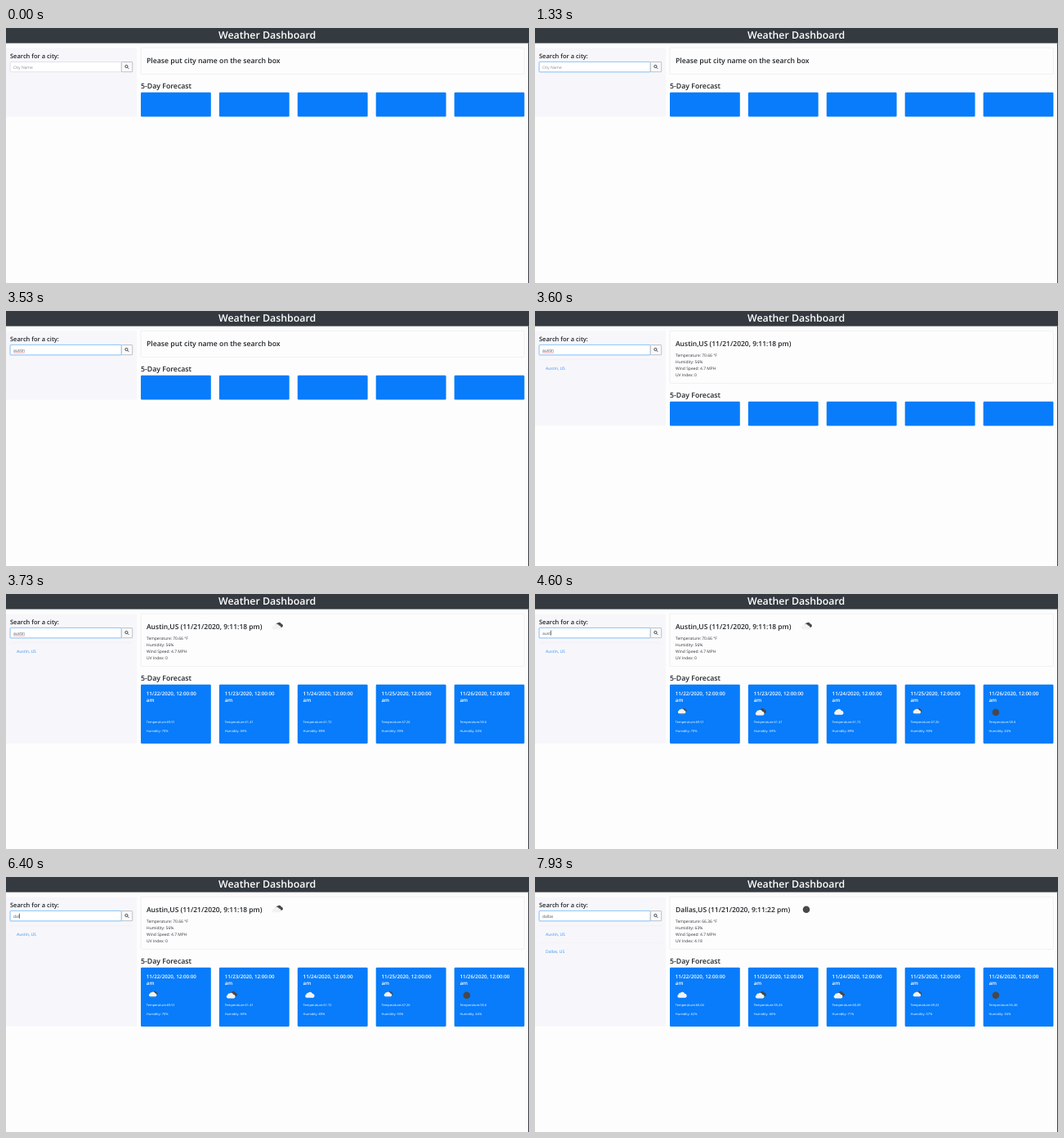
Write an HTML page that moves like this. It is 640 px wide and 312 px high and loops after 8 s.

```html
<!DOCTYPE html>
<html lang="en">
<head>
<meta charset="utf-8">
<title>Weather Dashboard</title>
<style>
  html, body { margin: 0; width: 100%; height: 100%; overflow: hidden; background: #fdfdfd; }
  svg { display: block; width: 100vw; height: 100vh; }
  text {
    font-family: "Open Sans", "Noto Sans", sans-serif;
    font-size: 4.95px; fill: #30353a; white-space: pre;
    text-rendering: geometricPrecision;
  }
  .head { font-weight: 600; fill: #212529; font-size: 8.7px; }
  .link { fill: #3a90f2; font-size: 5.05px; }
  .card-title { font-weight: 600; fill: #fff; font-size: 6.2px; }
  .card-text { fill: #fff; font-size: 3.97px; }
</style>
</head>
<body>
<svg id="stage" viewBox="0 0 640 312">
  <defs>
    <path id="puff" d="M-4 3.4a2.2 2.2 0 0 1-.5-4.2a2.1 2.1 0 0 1 2.3-1.9a3.2 3.2 0 0 1 5.3 1.1a2.6 2.6 0 0 1 .8 5z"/>
    <g id="clear"><circle r="4.3" cy=".4" fill="#48484a"/></g>
    <g id="cloud"><use href="#puff" fill="#f2f2f2"/></g>
    <g id="broken">
      <use href="#puff" transform="translate(2.2 -1.4) scale(.85)" fill="#48484a"/>
      <use href="#puff" transform="translate(-.8 .8) scale(.95)" fill="#f2f2f2"/>
    </g>
    <g id="rain">
      <use href="#puff" transform="translate(1.6 -2.2) scale(.68)" fill="#48484a"/>
      <use href="#puff" transform="translate(-.4 -.9) scale(.84)" fill="#f2f2f2"/>
      <path d="M-2 2.6l-.7 1.5M.4 2.6l-.7 1.5M2.8 2.6l-.7 1.5" stroke="#6b87a5" stroke-width=".6"/>
    </g>
  </defs>
  <rect width="640" height="312" fill="#fdfdfd"/>
  <rect id="side" y="24.5" width="160" fill="#f7f7fb"/>
  <rect width="640" height="18.6" fill="#343a40"/>
  <rect x="639" y="18.6" width="1" height="293.4" fill="#3c4045"/>
  <text class="head" x="319.6" y="13.4" text-anchor="middle" style="font-size:12.35px;fill:#fff">Weather Dashboard</text>

  <text class="head" x="5" y="37.2" style="font-size:7.5px">Search for a city:</text>
  <rect id="glow" x="4.5" y="40.8" width="137" height="13.7" rx="1.6" fill="#b8dafc"/>
  <rect id="input" x="5.2" y="41.5" width="136" height="12.2" rx=".8" fill="#fff" stroke-width=".6"/>
  <rect x="141.3" y="41.5" width="13.4" height="12.2" rx=".8" fill="#f8f9fa" stroke="#858c93" stroke-width=".5"/>
  <g fill="none" stroke="#343a40" stroke-width=".9">
    <circle cx="147.4" cy="47" r="1.6"/><path d="M148.6 48.2l1.7 1.7"/>
  </g>
  <text id="query" x="9" y="49.6"></text>
  <path id="squiggle" fill="none" stroke="#e5484d" stroke-width=".5"/>
  <rect id="caret" y="44.6" width=".6" height="6" fill="#111"/>
  <g id="history"></g>

  <rect id="panel" x="165" y="24.2" width="469.3" rx="1" fill="#fdfdfd" stroke="#e3e3e4" stroke-width=".5"/>
  <g id="now"></g>
  <text id="label" class="head" x="165" style="font-size:8.75px">5-Day Forecast</text>
  <g id="boxes" fill="#087cfa"></g>
  <g id="forecast"></g>
</svg>
<script>
const LOOP = 8000;
const $ = id => document.getElementById(id);
const set = (id, attrs) => { for (const k in attrs) $(id).setAttribute(k, attrs[k]); };
const text = (cls, x, y, str, more = '') => `<text class="${cls}" x="${x}" y="${y}" ${more}>${str}</text>`;
const icon = (name, x, y) => `<use href="#${name}" x="${x}" y="${y}"/>`;
const cardX = i => 165 + i * 95.9;

const cities = {
  Austin: {
    time: '9:11:18', temp: '70.66', humidity: 56, uv: '0', icon: 'broken',
    temps: ['69.51', '61.41', '61.72', '67.26', '58.6'],
    humidities: [70, 69, 89, 93, 46],
    icons: ['rain', 'broken', 'cloud', 'rain', 'clear']
  },
  Dallas: {
    time: '9:11:22', temp: '66.36', humidity: 63, uv: '4.18', icon: 'clear',
    temps: ['66.04', '55.45', '60.49', '69.22', '56.46'],
    humidities: [62, 66, 71, 57, 36],
    icons: ['cloud', 'broken', 'broken', 'rain', 'clear']
  }
};

// Input contents after each key press
const keys = [
  [1000, ''], [1660, 'a'], [1860, 'au'], [2000, 'aus'], [2200, 'aust'], [2330, 'austi'], [2530, 'austin'],
  [4400, 'austi'], [4600, 'aust'], [4800, 'aus'], [4930, 'au'], [5200, 'a'], [5530, ''],
  [5930, 'd'], [6130, 'da'], [6400, 'dal'], [6600, 'dall'], [6860, 'dalla'], [7330, 'dallas']
];

function nowView(name, withIcon) {
  if (!name) return text('head', 172, 43, 'Please put city name on the search box');
  const c = cities[name];
  const rows = [`Temperature: ${c.temp} °F`, `Humidity: ${c.humidity}%`, 'Wind Speed: 4.7 MPH', `UV Index: ${c.uv}`];
  return text('head', 172, 43, `${name},US (11/21/2020, ${c.time} pm)`, 'style="font-size:8.5px"') +
    rows.map((r, i) => text('', 172, 56 + i * 8, r)).join('') +
    (withIcon ? icon(c.icon, 332, 39.3) : '');
}

function forecastView(name, withIcons) {
  if (!name) return '';
  const c = cities[name];
  return c.temps.map((temp, i) => {
    const x = cardX(i) + 6.8;
    return text('card-title', x, 124, `11/${22 + i}/2020, 12:00:00`) +
      text('card-title', x, 132, 'am') +
      (withIcons ? icon(c.icons[i], x + 8.4, 144.4) : '') +
      text('card-text', x, 157.6, `Temperature:${temp}`) +
      text('card-text', x, 169.4, `Humidity: ${c.humidities[i]}%`);
  }).join('');
}

function historyView(names) {
  return names.map((n, i) =>
    `<path d="M5 ${59.5 + i * 21}H155" stroke="#ececf0" stroke-width=".5"/>` +
    text('link', 13, 72 + i * 21, n + ', US')).join('');
}

// Rewrites a group only when its markup changes
const shown = {};
function fill(id, html) {
  if (shown[id] !== html) $(id).innerHTML = shown[id] = html;
}

function drawInput(t) {
  const focus = t < 1000 ? 0 : t < 1060 ? 0.5 : 1;
  const [since, value] = keys.filter(k => k[0] <= t).pop() || [0, ''];
  set('glow', { opacity: focus });
  set('input', { stroke: focus ? '#6fb4f5' : '#ced4da' });
  fill('query', value || 'City Name');
  set('query', { style: `fill:${value ? '#495057' : '#868c93'}` });

  const width = value ? $('query').getComputedTextLength() : 0;
  const lit = t - since < (since === 1000 ? 330 : 470);
  set('caret', { x: 9.1 + width, opacity: focus && lit ? 1 : 0 });

  const wrong = t >= 3530 && t < 4400;
  set('squiggle', { opacity: wrong ? 1 : 0 });
  if (wrong) {
    let d = 'M9 51.4';
    for (let i = 1; i <= width; i++) d += `L${9 + i} ${i % 2 ? 50.7 : 51.4}`;
    set('squiggle', { d });
  }
}

function draw(t) {
  const city = t < 3600 ? '' : t < 7800 ? 'Austin' : 'Dallas';
  const days = t < 3660 ? '' : t < 7930 ? 'Austin' : 'Dallas';
  const shift = city ? 32 : 0;
  const bottom = days ? 183 : 108.5 + shift;

  drawInput(t);
  set('side', { height: bottom - 24.5 });
  set('panel', { height: 32.2 + shift });
  set('label', { y: 74.2 + shift });
  fill('boxes', [0, 1, 2, 3, 4].map(i =>
    `<rect x="${cardX(i)}" y="${78.8 + shift}" width="85.8" height="${bottom - 78.8 - shift}" rx="1.3"/>`).join(''));
  fill('history', historyView(['Austin', 'Dallas'].slice(0, !city ? 0 : city === 'Austin' ? 1 : 2)));
  fill('now', nowView(city, t >= 3730));
  fill('forecast', forecastView(days, t >= 3800));
}

const start = performance.now();
function tick() {
  draw((performance.now() - start) % LOOP);
  requestAnimationFrame(tick);
}
tick();
</script>
</body>
</html>
```
